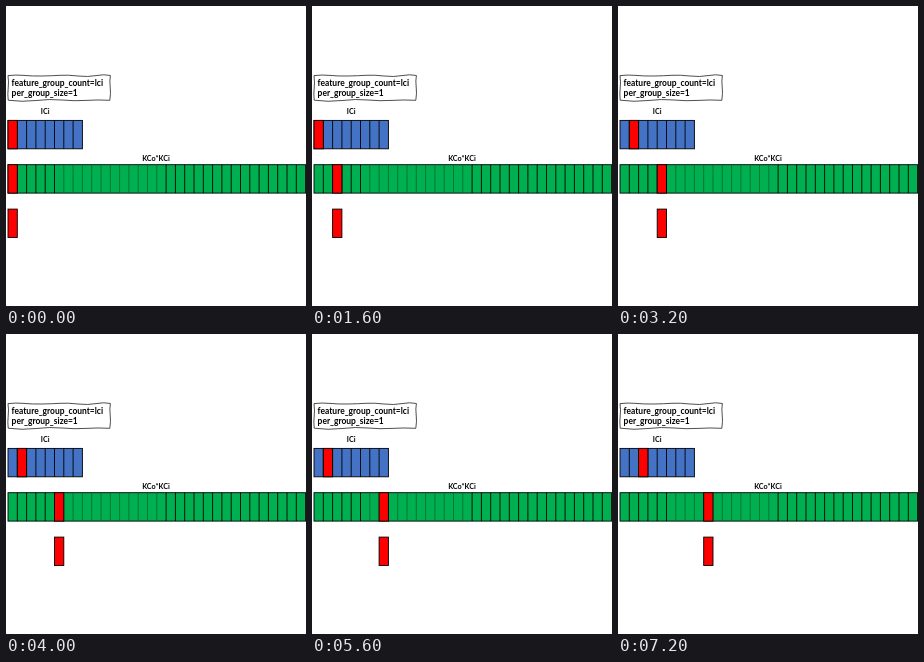
These frames come from a looping animation (300x300 px, 8 s). An HTML page:

```html
<!DOCTYPE html>
<html lang="en">
<head>
<meta charset="utf-8">
<title>Grouped convolution</title>
<style>
  html, body { margin: 0; width: 100%; height: 100%; overflow: hidden; background: #fff; }
  svg { display: block; width: 100vw; height: 100vh; }
  text { font: bold 8.45px Lato, Carlito, sans-serif; fill: #000; }
  .label { font-size: 7.2px; text-anchor: middle; }
  rect { stroke: #000; stroke-width: .9; }
  .soft { stroke: #08662f; stroke-width: .8; }
  .frame { fill: none; stroke: #222; stroke-width: .8; }
</style>
</head>
<body>
<svg viewBox="0 0 300 300">
  <path class="frame" d="M2 69.6 Q10 68.6 18 69.4 T36 70 T54 69.3 T72 70 T90 69.6 T104.4 69.5
    Q103.4 75 104.2 81 T103.8 94.3 Q92 93.6 80 94.4 T56 94 T30 94.5 T2.2 94.2 Q1.5 88 2.2 82 T2 69.6Z"/>
  <text x="5.6" y="79.6">feature_group_count=lci</text>
  <text x="5.6" y="90.2">per_group_size=1</text>
  <text class="label" x="39.2" y="108.2">ICi</text>
  <text class="label" x="150" y="154.8">KCo*KCi</text>
  <g id="cells"></g>
</svg>
<script>
  const LEFT = 2, PITCH = 9.3, HEIGHT = 28.4;
  const STEP = 800, STEPS = 10, PER_INPUT = 4;
  const INPUT_Y = 114.4, KERNEL_Y = 158.7, OUTPUT_Y = 203.1;
  const cells = document.getElementById('cells');

  function add(name, attrs) {
    const el = document.createElementNS('http://www.w3.org/2000/svg', name);
    for (const key in attrs) el.setAttribute(key, attrs[key]);
    return cells.appendChild(el);
  }

  function row(y, count, fill, isSoft = () => false) {
    add('rect', { x: LEFT, y, width: PITCH * count, height: HEIGHT, fill });
    for (let i = 1; i < count; i++) {
      const x = LEFT + PITCH * i;
      add('path', {
        d: `M${x} ${y}v${HEIGHT}`,
        stroke: '#000',
        'stroke-width': .9,
        class: isSoft(i) ? 'soft' : ''
      });
    }
  }

  const marker = y => add('rect', { x: LEFT, y, width: PITCH, height: HEIGHT, fill: '#f00' });
  const move = (el, i) => el.setAttribute('x', LEFT + PITCH * i);

  row(INPUT_Y, 8, '#4472c4');
  row(KERNEL_Y, 32, '#00b050', i => i > 5 && i < 17);
  const input = marker(INPUT_Y), kernel = marker(KERNEL_Y), output = marker(OUTPUT_Y);

  function draw(now) {
    const step = Math.floor(now / STEP) % STEPS;
    move(input, Math.floor(step / PER_INPUT));
    move(kernel, step);
    move(output, step);
  }

  const start = performance.now();
  function tick() {
    draw(performance.now() - start);
    requestAnimationFrame(tick);
  }
  tick();
</script>
</body>
</html>
```
